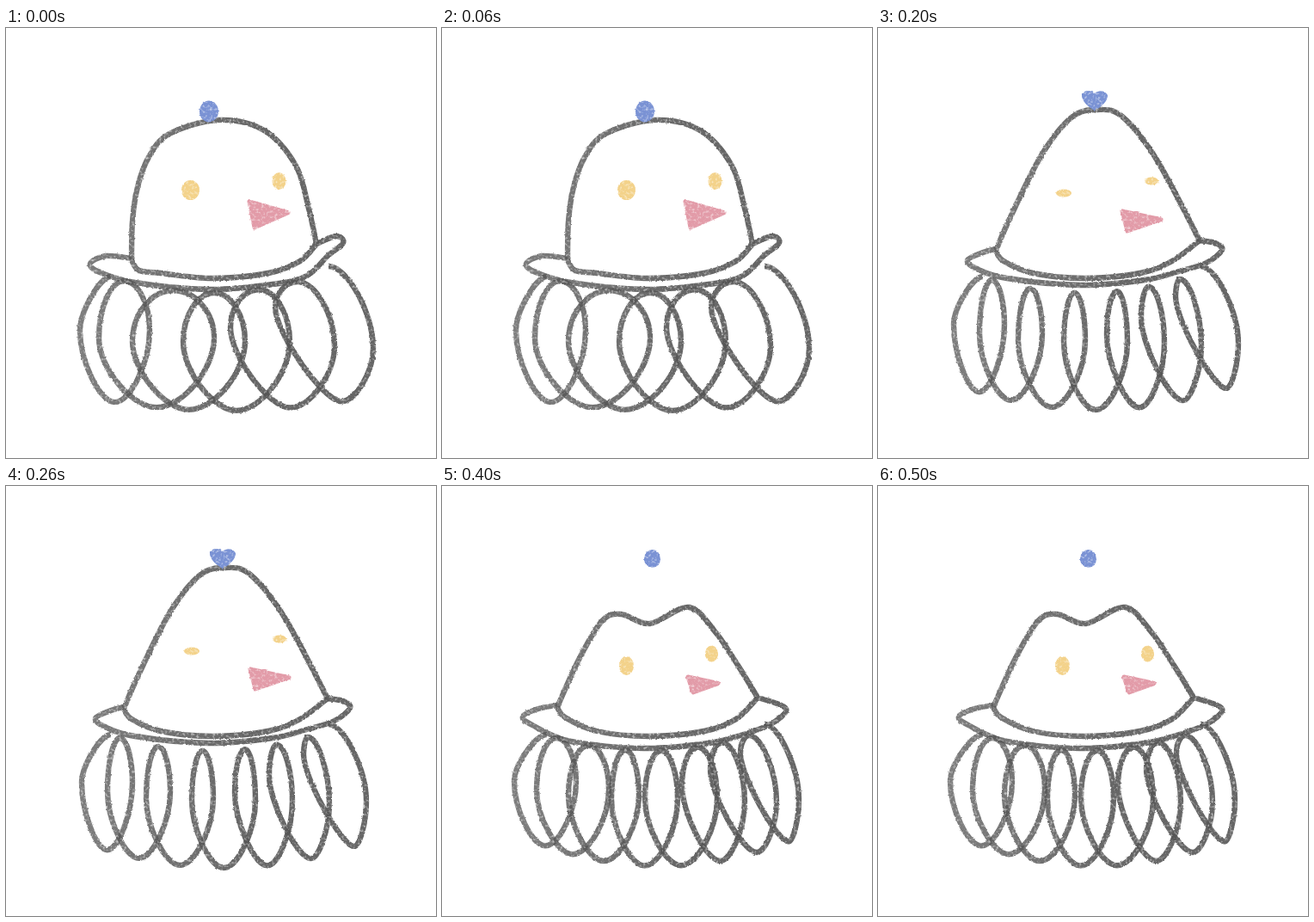
Animation, 500 px wide and 500 px high, one loop 0.57 s. Source, as an HTML page:

```html
<!DOCTYPE html>
<html lang="en">
<head>
<meta charset="utf-8">
<title>Crayon jelly</title>
<style>
  html, body { margin: 0; width: 100%; height: 100%; overflow: hidden; background: #fff; }
  svg { display: block; width: 100vw; height: 100vh; }
  .pose { visibility: hidden; animation: show 570ms step-end infinite; }
  .pose:last-child { animation-name: show-long; }
  .ink path { fill: none; stroke: url(#ink); stroke-width: 6.4; stroke-linejoin: round; }
  .blue { fill: #7a92d4; }
  .eye { fill: #f3d28a; }
  .beak { fill: #e29ba8; stroke: #e29ba8; stroke-width: 5; stroke-linejoin: round; }
  @keyframes show { 0% { visibility: visible } 17.5438%, 100% { visibility: hidden } }
  @keyframes show-long { 0% { visibility: visible } 29.8245%, 100% { visibility: hidden } }
</style>
</head>
<body>
<svg viewBox="0 0 500 500">
  <defs>
    <linearGradient id="ink" gradientUnits="userSpaceOnUse" x1="80" y1="0" x2="280" y2="0">
      <stop offset="0" stop-color="#555" stop-opacity=".76"/>
      <stop offset="1" stop-color="#555" stop-opacity=".9"/>
    </linearGradient>
    <filter id="crayon" filterUnits="userSpaceOnUse" x="0" y="0" width="500" height="500" color-interpolation-filters="sRGB">
      <feTurbulence type="fractalNoise" baseFrequency=".32" numOctaves="2" seed="4" result="noise"/>
      <feDisplacementMap in="SourceGraphic" in2="noise" scale="2.5" xChannelSelector="R" yChannelSelector="G" result="rough"/>
      <feColorMatrix in="noise" values="0 0 0 0 0  0 0 0 0 0  0 0 0 0 0  0 0 1.6 0 .2" result="grain"/>
      <feComposite in="rough" in2="grain" operator="in"/>
    </filter>
  </defs>
  <g id="stage"></g>
</svg>
<script>
// left, right: side extremes of each ruffle loop; floor, bend: arc of the loop bottoms
// tips: brim ends; low: lowest point of the brim
const poses = [
  {
    dome: [[146, 270], [147, 225], [153, 185], [166, 150], [190, 123], [247, 107], [300, 119], [337, 160], [352, 210], [361, 251]],
    tips: [[98, 274], [392, 250]], low: 304,
    left: [86, 108, 147, 206, 261, 313], right: [167, 242, 278, 330, 382, 427], floor: 445, bend: .0006,
    top: oval(236, 97, 11, 12.5),
    eyes: oval(214.5, 188.5, 10.5, 11.5) + oval(317.5, 178, 8, 10),
    beak: [283, 202, 45, 30]
  },
  {
    dome: [[145, 265], [147, 225], [155, 190], [176, 142], [208, 123], [243, 130], [293, 117], [330, 146], [356, 206], [366, 243]],
    tips: [[104, 271], [396, 254]], low: 304,
    left: [86, 108, 142, 204, 257, 299, 340], right: [166, 204, 252, 299, 346, 389, 424], floor: 446, bend: .0006,
    top: 'M241 127C230 108 234 74 251 71C268 72 266 108 244 127Z',
    eyes: oval(216, 191, 10.5, 12.5) + oval(318, 178, 8.5, 10.5),
    beak: [285, 208, 48, 26]
  },
  {
    dome: [[137, 259], [153, 222], [190, 148], [225, 104], [255, 95], [284, 103], [324, 153], [374, 247]],
    tips: [[104, 270], [400, 258]], low: 299,
    left: [88, 118, 163, 216, 266, 306, 346], right: [147, 191, 241, 290, 333, 376, 419], floor: 444, bend: .0011,
    top: 'M252 96C244 92 236 84 237 77C240 71 249 73 252 76C256 72 264 72 267 78C267 86 259 92 252 96Z',
    eyes: oval(216, 192, 9, 4.5) + oval(318, 178, 8, 4.5),
    beak: [284, 213, 45, 23]
  },
  {
    dome: [[135, 257], [160, 200], [195, 147], [250, 124], [305, 148], [345, 205], [372, 247]],
    tips: [[99, 270], [398, 257]], low: 306,
    left: [88, 117, 195, 263, 325], right: [181, 249, 318, 377, 413], floor: 438, bend: .001,
    top: 'M243 80C243 74 254 73 255 79C257 92 257 106 255 121L245 121C242 108 241 93 243 80Z',
    eyes: oval(215.5, 192, 8.5, 11.5) + oval(312, 182.5, 8, 9.5),
    beak: [285, 217, 41, 24]
  },
  {
    dome: [[134, 257], [160, 200], [186, 157], [208, 149], [242, 160], [287, 141], [318, 170], [345, 210], [367, 246]],
    tips: [[94, 268], [400, 262]], low: 305,
    left: [84, 110, 147, 197, 236, 279, 312, 347], right: [156, 194, 229, 274, 320, 352, 389, 415], floor: 442, bend: .0013,
    top: oval(244.5, 84.5, 9.5, 10.5),
    eyes: oval(214.5, 209, 8.5, 11) + oval(313.5, 195, 7.5, 9.5),
    beak: [286, 222, 35, 18]
  }
];

function oval(x, y, rx, ry) {
  return `M${x - rx} ${y}a${rx} ${ry} 0 1 1 ${2 * rx} 0a${rx} ${ry} 0 1 1 ${-2 * rx} 0Z`;
}

// Catmull-Rom curve through the points
function smooth(p) {
  const at = i => p[Math.max(0, Math.min(p.length - 1, i))];
  let d = 'M' + p[0];
  for (let i = 0; i < p.length - 1; i++) {
    const [a, b, c, e] = [at(i - 1), at(i), at(i + 1), at(i + 2)];
    const c1 = b.map((v, k) => v + (c[k] - a[k]) / 6);
    const c2 = c.map((v, k) => v - (e[k] - b[k]) / 6);
    d += `C${c1} ${c2} ${c}`;
  }
  return d;
}

// Curve between a flat extreme (top or bottom) and an upright one (left or right)
function quarter([x, y], [u, v], k, fromFlat) {
  return fromFlat
    ? `C${x + k * (u - x)} ${y} ${u} ${v + k * (y - v)} ${u} ${v}`
    : `C${x} ${y + k * (v - y)} ${u + k * (x - u)} ${v} ${u} ${v}`;
}

// One path per loop, down the left and up the right; loops tilt towards the right end
function ruffle({ left, right, floor, bend }) {
  const hem = x => 308 - .0013 * (x - 240) ** 2;
  const tilt = x => .22 * Math.max(0, x - 280);
  let top = [122, 289];
  return left.map((l, i) => {
    const r = right[i], mid = (l + r) / 2, lean = tilt(mid);
    const bx = mid + lean, by = floor - bend * (bx - 255) ** 2;
    const side = hem(mid) + .42 * (by - hem(mid));
    const a = [l, side - 1.2 * lean], b = [bx, by], c = [r, side + 1.2 * lean];
    const join = (r + left[i + 1]) / 2, nx = join - .55 * tilt(join);
    const next = i < left.length - 1 ? [nx, hem(nx)] : [375, 277];
    const d = 'M' + top
      + quarter(top, a, i ? .54 : .35, true)
      + quarter(a, b, .43 - .008 * lean, false)
      + quarter(b, c, .45, true)
      + quarter(c, next, .54 - .006 * lean, false);
    top = next;
    return d;
  });
}

function brim({ dome, tips: [[lx, ly], [rx, ry]], low }) {
  const [x, y] = dome[0];
  return smooth([[x, y - 2], [lx + 18, ly - 9], [lx, ly], [lx + 11, ly + 10], [150, low - 8], [235, low],
    [310, low - 6], [350, low - 16], [rx - 18, ry + 15], [rx, ry], [rx - 8, ry - 8], dome.at(-1)]);
}

function base({ dome }) {
  const [x, y] = dome[0];
  return smooth([[x, y], [x + 9, y + 12], [180, 285], [240, 291], [305, 285], [342, 271], dome.at(-1)]);
}

function draw(pose, i) {
  const lines = [...ruffle(pose), brim(pose), base(pose), smooth(pose.dome)];
  const delay = i ? i * 100 - 570 : 0;
  const [x, y, w, h] = pose.beak;
  return `<g class="pose" filter="url(#crayon)" style="animation-delay:${delay}ms">
    <g class="ink">${lines.map(d => `<path d="${d}"/>`).join('')}</g>
    <path class="blue" d="${pose.top}"/>
    <path class="eye" d="${pose.eyes}"/>
    <path class="beak" d="M${x} ${y}l${w} ${h * .42}L${x + 6} ${y + h}Z"/>
  </g>`;
}

document.getElementById('stage').innerHTML = poses.map(draw).join('');
</script>
</body>
</html>
```
